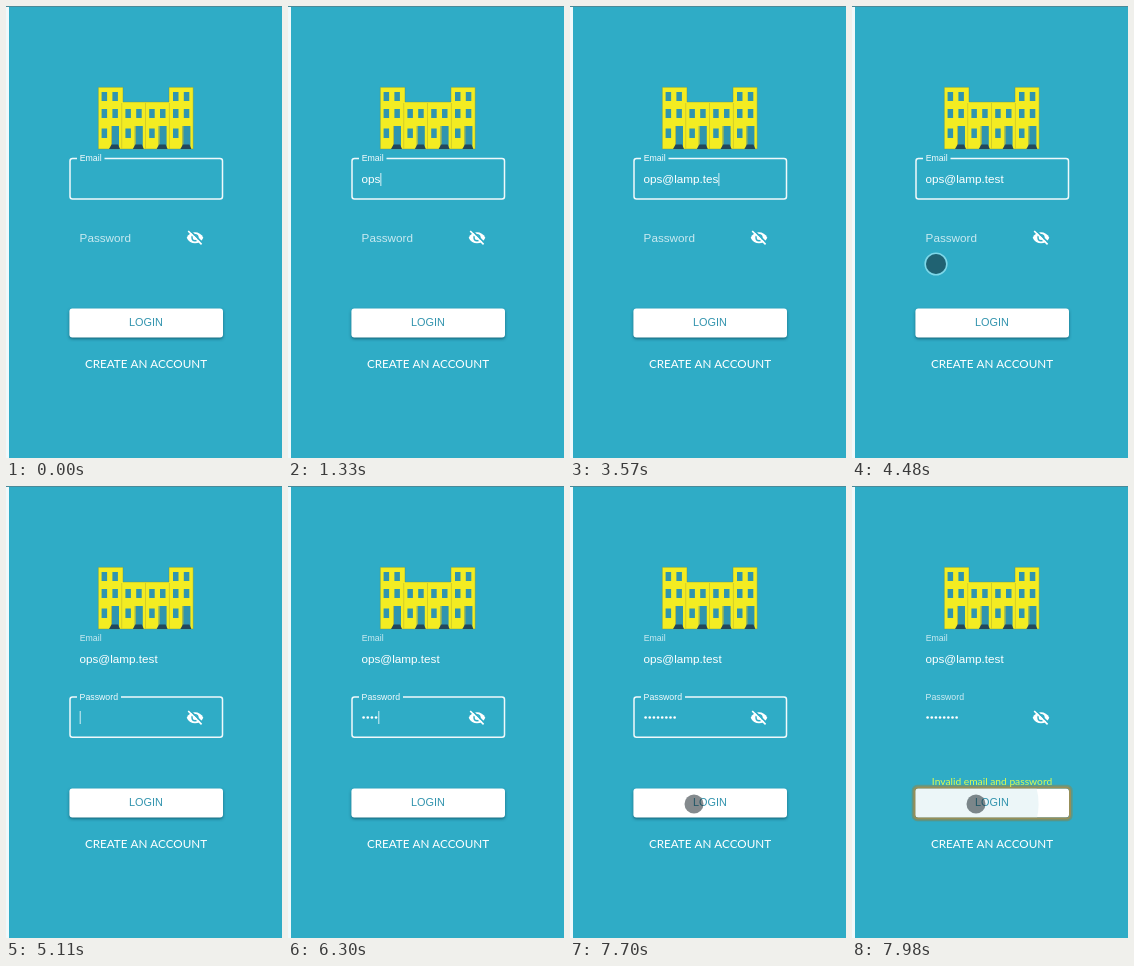
Recreate the animation shown at these times as an HTML page with a canvas. Size 276x452 px, loop 8000 ms.

```html
<!DOCTYPE html>
<html lang="en">
<head>
<meta charset="utf-8">
<title>Login</title>
<style>
html, body { margin: 0; width: 100%; height: 100%; overflow: hidden; background: #2facc6; }
canvas { display: block; width: 276px; height: 452px; }
</style>
</head>
<body>
<canvas id="stage"></canvas>
<script>
const W = 276, H = 452, LOOP = 8000;
const TEAL = '#2facc6', YELLOW = '#f3ec22', GLASS = '#2f95ae';
const SANS = '"Liberation Sans", Arial, sans-serif';
const LATO = 'Lato, sans-serif';

const EMAIL = 'ops@lamp.test';
const emailKeys = [840, 1050, 1260, 1820, 2310, 2450, 2660, 2800, 2940, 3150, 3360, 3570, 3710];
const passKeys = [5600, 5880, 6090, 6230, 6440, 6580, 6650, 6790];
const FOCUS_EMAIL = -570, FOCUS_PASS = 4720, SUBMIT = 7790, REPLY = 7910;

const canvas = document.getElementById('stage');
const ctx = canvas.getContext('2d');
const dpr = window.devicePixelRatio || 1;
canvas.width = W * dpr;
canvas.height = H * dpr;

const clamp = v => Math.max(0, Math.min(1, v));
const ramp = (t, start, ms) => clamp((t - start) / ms);
const ease = p => p * p * (3 - 2 * p);
const mix = (a, b, p) => a + (b - a) * p;
const white = a => `rgba(255,255,255,${a})`;

function box(x, y, w, h, color) {
  ctx.fillStyle = color;
  ctx.fillRect(x, y, w, h);
}

function disc(x, y, r, color) {
  ctx.fillStyle = color;
  ctx.beginPath();
  ctx.arc(x, y, r, 0, 7);
  ctx.fill();
}

function text(str, x, y, size, color, family = SANS, align = 'left') {
  ctx.font = `${size}px ${family}`;
  ctx.textAlign = align;
  ctx.fillStyle = color;
  ctx.fillText(str, x, y);
}

function background() {
  box(0, 0, W, H, TEAL);
  box(0, 0, 3, H, '#f0f9fb');
  box(0, 0, W, 1, '#4a8a98');
}

function building() {
  ctx.beginPath();
  ctx.moveTo(92.3, 143);
  ctx.lineTo(92.3, 81.3);
  ctx.lineTo(117, 81.3);
  ctx.lineTo(117, 96);
  ctx.lineTo(163, 96);
  ctx.lineTo(163, 81.3);
  ctx.lineTo(187.2, 81.3);
  ctx.lineTo(187.2, 143);
  ctx.closePath();
  ctx.fillStyle = YELLOW;
  ctx.fill();
  ctx.strokeStyle = 'rgba(95,140,90,.5)';
  ctx.lineWidth = 0.8;
  ctx.stroke();

  for (let i = 0; i < 4; i++) {
    const x = 92 + i * 23.8, tower = i === 0 || i === 3;
    if (i) box(x - 0.5, 97, 0.9, 46, '#cfca2a');
    for (const y of tower ? [86, 103] : [103]) {
      box(x + 3.6, y, 5.5, 9, GLASS);
      box(x + 14.4, y, 5.5, 9, GLASS);
    }
    box(x + 3.6, 122.5, 5.5, 9.5, GLASS);
    box(x + 13, 120, 8, 23, GLASS);
    box(x + 13, 120, 1, 23, '#b9bd3e');
    ctx.fillStyle = '#24475a';
    ctx.beginPath();
    ctx.moveTo(x + 11, 143);
    ctx.lineTo(x + 13.5, 138.5);
    ctx.lineTo(x + 20, 138.5);
    ctx.lineTo(x + 22, 143);
    ctx.fill();
  }
}

// Rounded outline with a notch in its top edge for the label
function outline(y, notchEnd, alpha) {
  if (alpha <= 0) return;
  const l = 64, r = 216.5, b = y + 40.3, k = 2.5;
  ctx.strokeStyle = white(0.93 * alpha);
  ctx.lineWidth = 1.5;
  ctx.beginPath();
  ctx.moveTo(notchEnd, y);
  ctx.arcTo(r, y, r, b, k);
  ctx.arcTo(r, b, l, b, k);
  ctx.arcTo(l, b, l, y, k);
  ctx.arcTo(l, y, r, y, k);
  ctx.lineTo(71, y);
  ctx.stroke();
}

function eyeOff(x, y) {
  ctx.fillStyle = '#fff';
  ctx.beginPath();
  ctx.moveTo(x - 8.3, y);
  ctx.bezierCurveTo(x - 5, y - 7.4, x + 5, y - 7.4, x + 8.3, y);
  ctx.bezierCurveTo(x + 5, y + 7.4, x - 5, y + 7.4, x - 8.3, y);
  ctx.fill();
  disc(x, y, 3.7, TEAL);
  disc(x, y, 2.3, '#fff');
  for (const [shift, color] of [[1.2, TEAL], [0, '#fff']]) {
    ctx.strokeStyle = color;
    ctx.lineWidth = 1.7;
    ctx.beginPath();
    ctx.moveTo(x - 6.8 + shift, y - 6.8 - shift);
    ctx.lineTo(x + 6.6 + shift, y + 6.6 - shift);
    ctx.stroke();
  }
}

function caret(t, x, y, keys, focus) {
  const last = keys.filter(k => k <= t).pop() ?? focus;
  if ((t - last) % 1000 < 500) box(x, y, 1, 13, '#d5f0f5');
}

const typed = (t, keys) => keys.filter(k => k <= t).length;

function emailField(t) {
  const off = ease(ramp(t, FOCUS_PASS, 150));
  outline(152.6, 98.5, 1 - off);
  text('Email', 73.7, 155.4, 8.75, white(mix(0.95, 0.75, off)));
  const value = EMAIL.slice(0, typed(t, emailKeys));
  text(value, 73.5, 177, 11.7, '#fff');
  if (t < FOCUS_PASS) caret(t, 73.5 + ctx.measureText(value).width, 167, emailKeys, FOCUS_EMAIL);
}

function passwordField(t) {
  const p = ease(ramp(t, FOCUS_PASS, 150));
  const off = ease(ramp(t, SUBMIT + 50, 140));
  outline(210.9, 115, p * (1 - off));
  text('Password', 73.6, mix(236, 214, p), mix(11.7, 8.75, p),
    white(mix(mix(0.74, 0.95, p), 0.78, off)));
  const n = typed(t, passKeys);
  for (let i = 0; i < n; i++) disc(75.6 + i * 4.15, 231.5, 1.3, '#fff');
  if (t >= FOCUS_PASS && t < SUBMIT) caret(t, 73.7 + n * 4.15, 225, passKeys, FOCUS_PASS);
  eyeOff(189, 231.8);
}

function button(t) {
  const x = 63.4, y = 302.5, w = 153.6, h = 29;
  const buttonShape = grow => {
    ctx.beginPath();
    ctx.roundRect(x - grow, y - grow, w + 2 * grow, h + 2 * grow, 3 + grow / 2);
  };

  ctx.save();
  ctx.shadowColor = 'rgba(0,40,55,.5)';
  ctx.shadowBlur = 3 * dpr;
  ctx.shadowOffsetY = 1.4 * dpr;
  ctx.fillStyle = '#fff';
  buttonShape(0);
  ctx.fill();
  ctx.restore();

  if (t >= SUBMIT) {
    ctx.save();
    buttonShape(0);
    ctx.clip();
    disc(124, 318, 62.6 * ramp(t, SUBMIT, 190), '#ecf6f8');
    ctx.restore();
  }
  if (t >= REPLY) {
    // Soft outer halo under a firmer inner rim
    for (const [grow, width, color] of [[2.2, 3, 'rgba(125,140,95,.6)'], [1, 2, '#978f58']]) {
      ctx.strokeStyle = color;
      ctx.lineWidth = width;
      buttonShape(grow);
      ctx.stroke();
    }
  }
  text('LOGIN', 140, 320.3, 10.9, '#3394ae', SANS, 'center');
}

function touch(t, x, y, start, end, ring) {
  const a = ramp(t, start, 100) * (1 - ramp(t, end, 100));
  if (a <= 0) return;
  if (ring) {
    ctx.strokeStyle = `rgba(135,220,235,${0.9 * a})`;
    ctx.lineWidth = 1.6;
    ctx.beginPath();
    ctx.arc(x, y, 10.8, 0, 7);
    ctx.stroke();
  }
  disc(x, y, ring ? 10 : 9.5, `rgba(20,30,36,${0.52 * a})`);
}

function draw(t) {
  ctx.setTransform(dpr, 0, 0, dpr, 0, 0);
  background();
  building();
  emailField(t);
  passwordField(t);
  button(t);
  if (t >= REPLY) text('Invalid email and password', 140, 298.8, 10.25, '#dcfb50', LATO, 'center');
  text('CREATE AN ACCOUNT', 140, 362.3, 11.7, '#fff', LATO, 'center');
  touch(t, 84, 258, 4270, 4640, true);
  touch(t, 124, 318, 7490, LOOP, false);
}

function tick(now) {
  draw(now % LOOP);
  requestAnimationFrame(tick);
}
requestAnimationFrame(tick);
</script>
</body>
</html>
```
